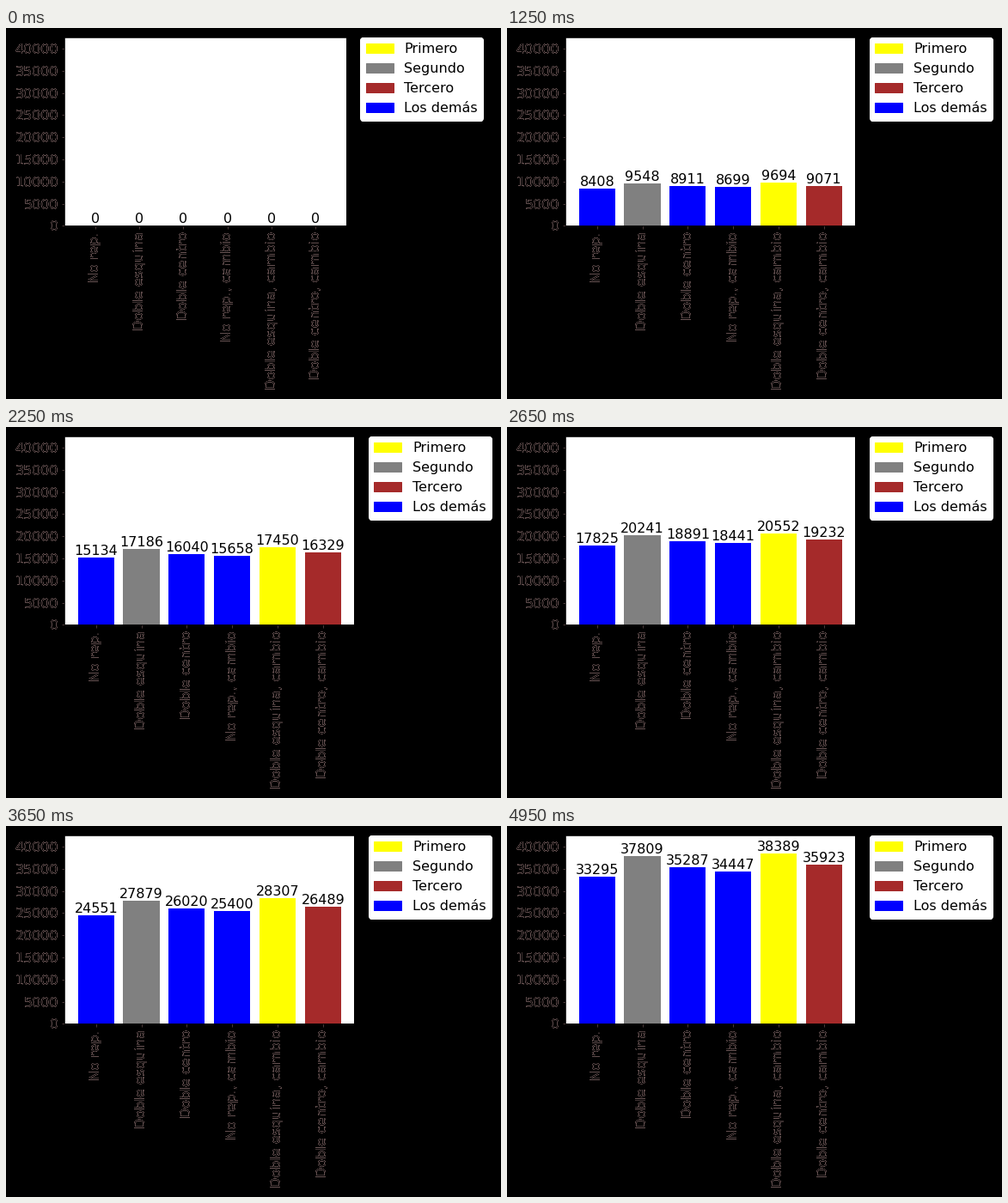
Write a matplotlib script that moves like this. It is 576 px wide and 432 px high and loops after 5000 ms.

```python
import numpy as np
import matplotlib.pyplot as plt
from matplotlib.animation import FuncAnimation
from matplotlib.patches import Patch

W, H, DPI = 576, 432, 72
FRAMES, INTERVAL = 100, 50

plt.rcParams["font.family"] = "DejaVu Sans"
plt.rcParams["font.size"] = 16

# Each strategy's total at the end of the loop; it grows at a steady rate.
FINAL = {
    "No rep.": 33295,
    "Doble esquina": 37809,
    "Doble centro": 35287,
    "No rep., cambio": 34447,
    "Doble esquina, cambio": 38389,
    "Doble centro, cambio": 35923,
}
PLACES = {"Primero": "yellow", "Segundo": "gray",
          "Tercero": "brown", "Los demás": "blue"}
COLORS = list(PLACES.values())

LEFT, TOP, BOTTOM = 68.35, 10.8, 230.3
FIRST_RIGHT, RIGHT = 395.8, 405.2
TICK_GAP = 7
RIM = "#e0b4b4"


def axes_box(right):
    return [LEFT / W, 1 - BOTTOM / H, (right - LEFT) / W, (BOTTOM - TOP) / H]


def rimmed_label(text, xy, coords, offset, **style):
    """Black text on black: only its soft edges stay visible."""
    for color in (RIM, RIM, RIM, "black"):
        ax.annotate(text, xy, xycoords=coords, xytext=offset,
                    textcoords="offset points", color=color, **style)


fig = plt.figure(figsize=(W / DPI, H / DPI), dpi=DPI, facecolor="black")
ax = fig.add_axes(axes_box(FIRST_RIGHT), facecolor="white")

slots = np.arange(len(FINAL))
bars = ax.bar(slots, 0 * slots, width=0.8, linewidth=0)
labels = [ax.text(x, 0, "0", ha="center", va="bottom") for x in slots]

ax.set_xlim(-0.69, 5.69)
ax.set_ylim(0, 42600)
ax.set_xticks(slots)
ax.set_yticks(range(0, 40001, 5000))
ax.tick_params(color="#5a4646", labelbottom=False, labelleft=False)

for x, name in zip(slots, FINAL):
    rimmed_label(name, (x, 0), ax.get_xaxis_transform(), (0, -TICK_GAP),
                 rotation=90, ha="center", va="top")
for y in range(0, 40001, 5000):
    rimmed_label(str(y), (0, y), ax.get_yaxis_transform(), (-TICK_GAP, 0),
                 ha="right", va="center_baseline")

ax.legend(handles=[Patch(color=c, label=name) for name, c in PLACES.items()],
          bbox_to_anchor=(1.05, 1), loc="upper left", borderaxespad=0,
          framealpha=1, facecolor="white", edgecolor="white")


def update(frame):
    ax.set_position(axes_box(RIGHT if frame else FIRST_RIGHT))
    totals = [round(final * frame / (FRAMES - 1)) for final in FINAL.values()]
    ranking = sorted(slots, key=lambda i: -totals[i])
    for rank, i in enumerate(ranking):
        bars[i].set_height(totals[i])
        bars[i].set_facecolor(COLORS[min(rank, 3)])
        labels[i].set_y(totals[i])
        labels[i].set_text(str(totals[i]))
    return [*bars, *labels]


anim = FuncAnimation(fig, update, frames=FRAMES, interval=INTERVAL,
                     repeat=True, repeat_delay=0, blit=False)
plt.show()
```
